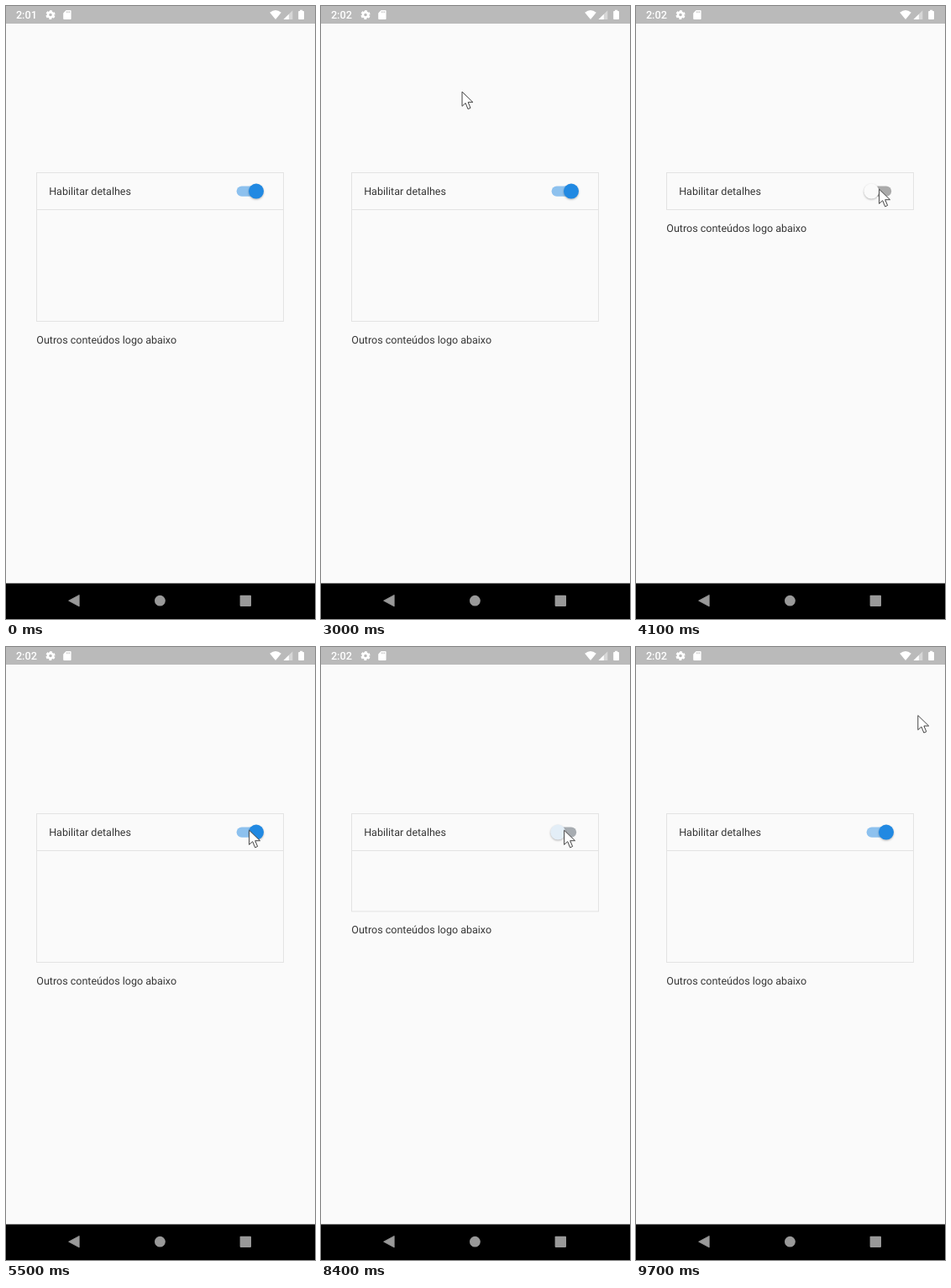
An HTML page that plays this animation: 368x730 px, repeating every 9800 ms.

```html
<!DOCTYPE html>
<html lang="pt">
<head>
<meta charset="utf-8">
<title>Habilitar detalhes</title>
<style>
  html, body { margin: 0; width: 100%; height: 100%; overflow: hidden; background: #fafafa; }
  svg { display: block; width: 368px; height: 730px; }
  text { font: 12.53px Roboto, Arial, sans-serif; fill: #363636; text-rendering: geometricPrecision; }
  #clock { font-size: 12.7px; font-weight: 500; fill: #fff; }
  .line { fill: none; stroke: #e3e3e3; }
  #thumb { filter: drop-shadow(0 1px 1px rgba(0, 0, 0, .28)); }
</style>
</head>
<body>
<svg viewBox="0 0 368 730">
  <rect width="368" height="730" fill="#fafafa"/>

  <!-- status bar -->
  <rect width="368" height="21" fill="#bababa"/>
  <text id="clock" x="11.9" y="15.2">2:01</text>
  <g fill="none" stroke="#fff">
    <circle cx="53" cy="10.5" r="3.1" stroke-width="2.6"/>
    <circle cx="53" cy="10.5" r="4.8" stroke-width="1.6" stroke-dasharray="2.9 2.127" stroke-dashoffset="-1.06"/>
  </g>
  <g fill="#fff">
    <path d="M71.6 5H76.6Q77.6 5 77.6 6V15Q77.6 16 76.6 16H69.2Q68.2 16 68.2 15V8.4Z"/>
    <path d="M314.2 7.8Q321 2.4 327.8 7.8L321 16Z"/>
    <path d="M330.5 16H341.3V5.2Z" opacity=".42"/>
    <path d="M330.5 16H336.8V9.7Z"/>
    <path d="M350 4.8H353.2V6H354.2Q355 6 355 6.8V15.2Q355 16 354.2 16H349Q348.2 16 348.2 15.2V6.8Q348.2 6 349 6H350Z"/>
  </g>
  <path d="M72.3 6.3V8.2M74 6.3V8.2M75.7 6.3V8.2" stroke="#bababa" stroke-width=".8"/>

  <!-- card -->
  <rect id="card" class="line" x="36.5" y="198.5" width="294" height="177"/>
  <path class="line" d="M37 242.5H330"/>
  <text x="51.2" y="225">Habilitar detalhes</text>
  <rect id="track" x="274.6" y="214.4" width="29.6" height="12.4" rx="6.2"/>
  <circle id="thumb" cy="220.6" r="9"/>
  <text id="below" x="36.3">Outros conteúdos logo abaixo</text>

  <!-- navigation bar -->
  <rect y="687.5" width="368" height="43" fill="#000"/>
  <g fill="#999">
    <path d="M74.6 708.2L87.2 701.4V715Z" stroke="#999" stroke-width=".8" stroke-linejoin="round"/>
    <circle cx="183.4" cy="708.2" r="6.4"/>
    <rect x="278.6" y="701.7" width="13.4" height="13.2" rx=".8"/>
  </g>

  <path id="cursor" d="M0 0V17.2L4.1 13.5L7 20.6L10 19.3L7.1 12.5H12.9Z"
        fill="#fff" stroke="#444" stroke-linejoin="round"/>
</svg>
<script>
const LOOP = 9800, STEP = 100;
const CLOSED = 44, EXTRA = 133;
const OFF = { thumb: [250, 250, 250], track: [170, 170, 170] };
const ON = { thumb: [33, 137, 226], track: [141, 193, 238] };

// the switch is tapped; the second tap lands at once
const taps = [
  { at: -200, on: true, lasts: 200 },
  { at: 3800, on: false, lasts: 200 },
  { at: 5500, on: true, lasts: 0 },
  { at: 6640, on: false, lasts: 200 },
  { at: 8335, on: true, lasts: 200 },
];

// places where the pointer rests or turns
const REST = [289.6, 218.2], AWAY = [331.5, 86.5];
const stops = [
  { at: 1300, xy: [31.5, 527] },
  { at: 1600, xy: [125.5, 512.5] },
  { at: 2700, xy: [125.5, 61.5] },
  { at: 3600, xy: REST },
  { at: 8600, xy: REST },
  { at: 9100, xy: AWAY },
  { at: 9300, xy: AWAY },
  { at: 9700, xy: [335.8, 81.5] },
];

const $ = id => document.getElementById(id);
const [clock, card, track, thumb, below, cursor] =
  ['clock', 'card', 'track', 'thumb', 'below', 'cursor'].map($);
const mix = (a, b, p) => a + (b - a) * p;
const tint = (part, p) => `rgb(${OFF[part].map((c, i) => Math.round(mix(c, ON[part][i], p)))})`;
const easeIn = p => p * p;
const easeOut = p => 1 - (1 - p) ** 2;
const smooth = p => p * p * (3 - 2 * p);

function drawCard(t) {
  const tap = taps.findLast(tap => tap.at <= t);
  const p = tap.lasts ? Math.min(1, (t - tap.at) / tap.lasts) : 1;
  const toward = q => tap.on ? q : 1 - q;
  const open = toward(easeOut(p)), on = toward(easeIn(p));
  card.setAttribute('height', CLOSED + EXTRA * open);
  below.setAttribute('y', 269 + EXTRA * open);
  thumb.setAttribute('cx', mix(280.4, 298, on));
  thumb.setAttribute('fill', tint('thumb', on));
  track.setAttribute('fill', tint('track', on));
}

function drawCursor(t) {
  const shown = t >= 1300 && t < 1900 || t >= 2700;
  cursor.style.display = shown ? '' : 'none';
  if (!shown) return;
  const i = stops.findLastIndex(stop => stop.at <= t);
  const from = stops[i], to = stops[i + 1] || from;
  const still = to === from || t < 1900 && t >= 1600;
  const p = still ? 0 : smooth((t - from.at) / (to.at - from.at));
  cursor.setAttribute('transform', `translate(${from.xy.map((v, k) => mix(v, to.xy[k], p))})`);
}

function draw(time) {
  const t = Math.floor(time % LOOP / STEP) * STEP;
  clock.textContent = t < 700 ? '2:01' : '2:02';
  drawCard(t);
  drawCursor(t);
}

const begin = performance.now();
function tick() {
  draw(performance.now() - begin);
  requestAnimationFrame(tick);
}
tick();
</script>
</body>
</html>
```
